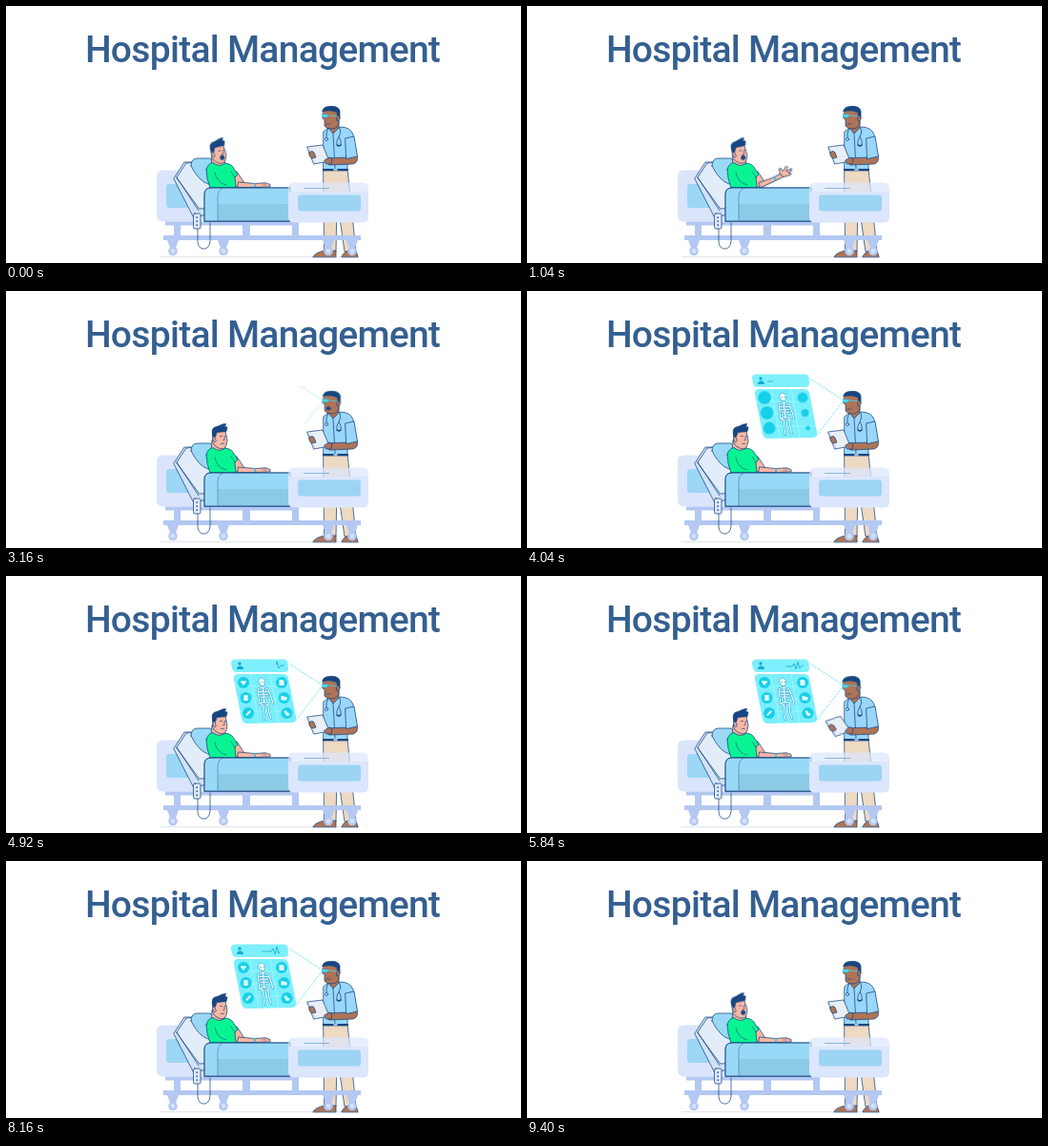
These frames come from a looping animation (540 px wide and 270 px high, 9.44 s). An HTML page:

```html
<!DOCTYPE html>
<html lang="en">
<head>
<meta charset="utf-8">
<title>Hospital Management</title>
<style>
html, body { margin: 0; width: 100%; height: 100%; overflow: hidden; background: #fff; }
svg { display: block; width: 100%; height: 100%; --loop: 9.44s; }
.title { font: 500 39px Roboto, sans-serif; letter-spacing: -.75px; fill: #345f91; text-anchor: middle; }
.ink { stroke: #174681; stroke-width: .75; stroke-linejoin: round; stroke-linecap: round; }
.line { fill: none; }
.skin { fill: #f8b7a2; }
.brown { fill: #ae7457; }
.shirt { fill: #9ad7fb; }
.rail { fill: #b3c8f2; }
.navy { fill: #174681; }
.anim { animation: var(--loop) ease-in-out infinite both; }

.arm { animation-name: gesture; transform-origin: 245px 187px; }
.fingers { animation-name: spread; transform-origin: 269px 188px; }
.patient-head { animation-name: patient-turn; transform-origin: 221px 166px; }
.doctor-head { animation-name: doctor-nod; transform-origin: 343px 128px; }
.tablet { animation-name: tilt; transform-origin: 336px 163px; }
.patient-talk { animation-name: patient-talk; animation-timing-function: step-end; }
.doctor-talk { animation-name: doctor-talk; animation-timing-function: step-end; }
.mouth { animation: speak calc(var(--loop) / 18) ease-in-out infinite; transform-box: fill-box; transform-origin: center; }
.beam { animation-name: beam; stroke: #55def0; stroke-width: .9; stroke-dasharray: 2 1.4; fill: none; }
.cone { animation-name: cone; transform-origin: 332px 115px; }
.board { animation-name: board; transform-origin: 270px 129px; }
.bar { animation-name: board; transform-origin: 266px 94px; }
.icon { animation-name: pop; transform-box: fill-box; transform-origin: center; }
.glyph { animation-name: glyph; }
.pulse { animation: pulse calc(var(--loop) / 8) linear -.754s infinite; stroke-dasharray: 63 200; }

@keyframes gesture {
  0%, 3% { transform: none; }
  7% { transform: rotate(-30deg); }
  10% { transform: rotate(-24deg); }
  13% { transform: rotate(-30deg); }
  16.5% { transform: rotate(-23deg); }
  20%, 23% { transform: rotate(-30deg); }
  26% { transform: rotate(-24deg); }
  31.5%, 100% { transform: none; }
}
@keyframes spread {
  0%, 3% { transform: scale(.3); }
  7%, 27% { transform: none; }
  31%, 100% { transform: scale(.3); }
}
@keyframes patient-turn {
  0%, 30.6% { transform: rotate(-7deg); }
  33%, 94.5% { transform: none; }
  96%, 100% { transform: rotate(-7deg); }
}
@keyframes doctor-nod {
  0%, 30% { transform: none; }
  33%, 38% { transform: rotate(2deg); }
  42%, 54% { transform: none; }
  58%, 68% { transform: rotate(-3deg); }
  72%, 100% { transform: none; }
}
@keyframes tilt {
  0%, 52% { transform: none; }
  58%, 66% { transform: rotate(-12deg); }
  71%, 100% { transform: none; }
}
@keyframes patient-talk { 0% { opacity: 1; } 31% { opacity: 0; } 95% { opacity: 1; } }
@keyframes doctor-talk { 0% { opacity: 0; } 31% { opacity: 1; } 40% { opacity: 0; } }
@keyframes speak { 0%, 100% { transform: none; } 50% { transform: scaleY(.4); } }
@keyframes cone {
  0%, 31% { transform: scale(0); }
  33.5% { transform: scale(.68); }
  36%, 95% { transform: none; }
  98%, 100% { transform: scale(0); }
}
@keyframes beam { 0%, 31% { opacity: 0; } 32%, 96% { opacity: 1; } 98%, 100% { opacity: 0; } }
@keyframes board {
  0%, 35% { opacity: 0; transform: scale(.3); }
  39%, 94% { opacity: 1; transform: none; }
  97%, 100% { opacity: 0; transform: scale(.3); }
}
@keyframes pop {
  0%, 39% { transform: scale(0); }
  42.5% { transform: scale(1.15); }
  45%, 96% { transform: none; }
  97%, 100% { transform: scale(0); }
}
@keyframes glyph { 0%, 42.5% { opacity: 0; } 46%, 97% { opacity: 1; } 98%, 100% { opacity: 0; } }
@keyframes pulse { from { stroke-dashoffset: 63; } to { stroke-dashoffset: -100; } }
</style>
</head>
<body>
<svg viewBox="0 0 540 270" xmlns="http://www.w3.org/2000/svg">
  <text class="title" x="269" y="59">Hospital Management</text>
  <path d="M162 263.6H370" stroke="#d8dce4" stroke-width=".8"/>

  <!-- doctor -->
  <g class="ink">
    <path d="M333 171H358L367 258H355L347 202 346 258H334Z" fill="#eed9c2"/>
    <path class="brown" d="M322 263.5Q324 259 334 257H346V263.5ZM352 263.5Q354 258 360 257H367L369 263.5Z"/>
    <path class="brown" d="M338 123L339 133 344 136 349 129V121Z"/>
    <path class="shirt" d="M333 132L338 128 343 134 350 127Q361 127 364 135L368 158 358 160 358 173H333Z"/>
    <path class="line" d="M343 134L345 171M357 141L358 160"/>
    <path d="M333 172H358" stroke-width="1.8"/>
    <path d="M344 172H347" stroke="#d7e8f5" stroke-width="1.6"/>
    <path class="line" d="M338 128Q335 133 336 139M350 128Q352 133 349 138M349 138Q346 141 347 146M349 138Q352 141 351 146"/>
    <circle cx="336" cy="140" r="1.5" fill="#d9f3ff"/>
    <path class="line" d="M347 146Q349 148 351 146" stroke-width="1.2"/>
    <path class="brown" d="M358 159L368 157Q370 164 364 166L339 167 335 163 338 160Z"/>
    <path class="shirt" d="M356 139L365 137 368.5 158 357 160.5Z"/>
  </g>
  <g class="anim doctor-head ink">
    <path class="brown" d="M333 109L348 109 349 123Q348 129 341 129 336 129 334 126L334 119 332 118Z"/>
    <path class="navy" d="M332 110.5Q332 106 339 105.5 348 104.5 350 110L350 118 348 119 347 111.5Q340 108.5 332 110.5Z"/>
    <path class="brown" d="M347 116Q350.5 114 350 118T347 120.5Z"/>
    <path d="M331.5 114H337.5L337 116.8H332Z" fill="#45e2f4" stroke="#2bb9d8" stroke-width=".5"/>
    <path d="M338 114.8L347 116" stroke="#45d5ef" stroke-width=".8"/>
    <path class="line" d="M336 124H340" stroke-width=".7"/>
    <g class="anim doctor-talk"><ellipse class="mouth navy" cx="338" cy="123.5" rx="2" ry="1.6"/></g>
  </g>
  <g class="anim tablet ink">
    <path d="M316 148L332 146 339 163 323 166Z" fill="#e9eff6"/>
    <path class="line" d="M317.5 149L324 164.5" stroke="#b9cef1"/>
    <path class="brown" d="M318 154Q321 151 323 154L325 159 321 160Q317 158 318 154Z"/>
    <path class="brown" d="M334 162L339 159 342 161 341 166 336 166Z"/>
  </g>

  <!-- headboard and backrest -->
  <rect x="158" y="172.5" width="52" height="54" rx="6" fill="#dae5fc"/>
  <rect x="168" y="187" width="36" height="25" rx="3" fill="#9cd7f5"/>
  <g class="ink">
    <path d="M176 181L187 164H207L224 216 197 222Z" fill="#d3e3f7"/>
    <path d="M179 180L189 165 211 163 225 212 203 213Z" fill="#e2edf9"/>
    <path class="line" d="M179 180L202 215"/>
    <path d="M194 168Q194 160 201 160H214Q219 164 218 172L219 188 212 187Q202 184 194 168Z" fill="#9bd8f5"/>
  </g>

  <!-- patient -->
  <g class="ink">
    <path class="skin" d="M216 157L215 168 223 172 230 168 229 158Z"/>
    <path class="skin" d="M238 174L242 174 250 186 247 190 240 190Z"/>
    <path d="M210 172Q211 166 217 164.5 223 170 230 165 237 166 239 171L243 177 240 180 241 191H214Q210 181 210 172Z" fill="#08f493"/>
    <path class="line" d="M219 175Q221 186 231 188M236 174L240 180" stroke-width=".6"/>
  </g>
  <g class="anim patient-head ink">
    <path class="skin" d="M217 148L230 147 232 157 231 162Q229 167 224 165.5 219 164 217 160Z"/>
    <path class="navy" d="M217 153Q215 146 218 143.5 222 142.5 227 140L230.5 139.5 229.5 142.5 232 143 231 147.5 221 148.5 219.5 153Z"/>
    <path class="skin" d="M219 154Q216 152 217 156T220 158Z"/>
    <path class="line" d="M224.5 152.5H226.5M229.5 152.5H230.8M229 153.5V156.5L227.8 156.7M225.5 160.5L228.5 160.2" stroke-width=".7"/>
    <g class="anim patient-talk"><ellipse class="mouth navy" cx="227.5" cy="160" rx="2" ry="2.4"/></g>
  </g>
  <g class="anim arm ink">
    <path class="skin" d="M244 185L261 186.5 272 185.8 277 187.5 277 190 262 190.5 243 190.5Z"/>
    <g class="anim fingers skin">
      <path d="M268 186L269 181 271 181 272 185 277 181.5 278.5 183 275 186.5 281 186V188L276 189 279 191 277 192 270 190.5Z"/>
    </g>
    <path d="M261 186.5V190" stroke="#25bfe4" stroke-width="1.6"/>
  </g>

  <!-- bed -->
  <g class="rail">
    <path d="M167 226.5H302V230.5H167ZM165 241H372V246H165ZM176 230H183V241H176ZM248 230H256V241H248ZM300 227H307V241H300Z"/>
    <g id="casters"></g>
  </g>
  <g class="ink">
    <path d="M208 226V198Q208 191 215 191H298V226Z" fill="#8ccae6"/>
    <path d="M208.5 225.5V198Q208.5 191.5 215 191.5H297V208H222V225.5Z" fill="#99d9f8" stroke="none"/>
    <path class="line" d="M208 226V198Q208 191 215 191H298M208 226H298"/>
    <path class="line" d="M222 225V201Q222 193 227 191.5" stroke-width=".6" opacity=".7"/>
    <path class="line" d="M201 234V248Q202 256 209 255 215 253 214 242V228"/>
    <rect x="196.5" y="218" width="7.5" height="16" rx="1.5" fill="#dce8fb"/>
    <path d="M200.2 222V222.3M200.2 226V226.3M200.2 230V230.3" stroke-width="1.6"/>
  </g>
  <path d="M296 195V191.5Q296 185.5 302 185.5H374Q380 185.5 380 191.5V195Z" fill="#dce6fc" opacity=".7"/>
  <path d="M296 195H380V221.5Q380 227.5 374 227.5H302Q296 227.5 296 221.5Z" fill="#dce6fc"/>
  <path d="M312 191.5H339" stroke="#6fa9d2" stroke-width=".8"/>
  <rect x="306" y="198.5" width="66" height="17" rx="3" fill="#9cd5f3"/>

  <!-- hologram -->
  <g class="anim cone"><path class="anim beam" d="M332 115L297 92M332 115L304.5 151"/></g>
  <g class="anim bar">
    <path d="M241 87.5H291Q295 87.5 295.5 91L296 97Q296 101 292 101H242Q238 101 237 97L236 92Q235.5 87.5 241 87.5Z" fill="#7df0fb"/>
    <circle cx="245" cy="92" r="1.7" fill="#14a9d3"/>
    <path d="M242 98Q242 94.5 245.5 94.5T249 98Z" fill="#14a9d3"/>
    <path class="pulse" pathLength="100" d="M252 95H278L280 92 282 98 284 90 286 97 288 94H292" fill="none" stroke="#15a9cb" stroke-width=".8"/>
  </g>
  <g class="anim board">
    <path d="M243 103H290Q295 103 296 107L304 148Q305 154 299 154L253 155Q248 155 247 150L239 109Q238 103 243 103Z" fill="#79effb"/>
    <path d="M240 116H297M242 129H300M245 142H303M256 103L265 154M277 103L286 154" stroke="#bafaff" stroke-width=".5"/>
    <g fill="none" stroke-linecap="round" stroke-linejoin="round">
      <path id="bone" d="M269 115L271 134M264 119Q269 116 275 119M265 122Q270 120 275 122M266 125Q270 123 275 125M267 128Q271 126 275 128M264 119L265 127 266 135M275 119L278 127 280 134M267 134Q272 130 276 134L274 136H269ZM269 136L270 144 271 151M275 136L276 144 278 150" stroke="#299ccc" stroke-width="2.1"/>
    </g>
    <path d="M264.5 111Q265 107 268.5 107.3 272 108 271.8 112L270.5 115.5H267Z" fill="#fff" stroke="#299ccc" stroke-width=".6"/>
    <path d="M267 111.5H267.3M270 111.5H270.3" stroke="#299ccc" stroke-linecap="round"/>
    <g id="icons"></g>
  </g>
</svg>
<script>
const fill = (id, items, draw) =>
  document.getElementById(id).innerHTML = items.map(draw).join('');

fill('casters', [175, 228, 338, 363], x =>
  `<path d="M${x - 6} 246H${x + 6}L${x + 3} 254H${x - 3}Z"/>
   <circle cx="${x}" cy="257.5" r="4.8"/><circle cx="${x}" cy="257.5" r="2.4" fill="#d5e1f9"/>`);

// A white copy of the bones sits inside the blue edge.
const bone = document.getElementById('bone');
const marrow = bone.cloneNode();
marrow.removeAttribute('id');
marrow.setAttribute('stroke', '#fff');
marrow.setAttribute('stroke-width', '1.1');
bone.after(marrow);

const icons = [
  [249, 112, 'M0 3L-3-.5Q-3-3 0-1.5 3-3 3-.5Z'],
  [251.5, 128, 'M-2.2-3H2.2V3H-2.2Z'],
  [254, 144, 'M-3 2L1.5-3 3-1.5-1.5 3Z'],
  [289, 112, 'M-2.5-3H1L2.5-1.5V3H-2.5Z'],
  [291.5, 128, 'M-3-2H-.5L.5-1H3V2.5H-3Z'],
  [294.5, 144, 'M-3-2L-1-3 1 0 3 0 2 3-.5 3Z']
];
fill('icons', icons, ([x, y, shape], i) => {
  const delay = `style="animation-delay:${i * 45}ms"`;
  return `<g transform="translate(${x} ${y})">
    <circle class="anim icon" ${delay} r="6" fill="#17cfe8"/>
    <path class="anim glyph" ${delay} d="${shape}" fill="#e5fdff"/></g>`;
});
</script>
</body>
</html>
```
